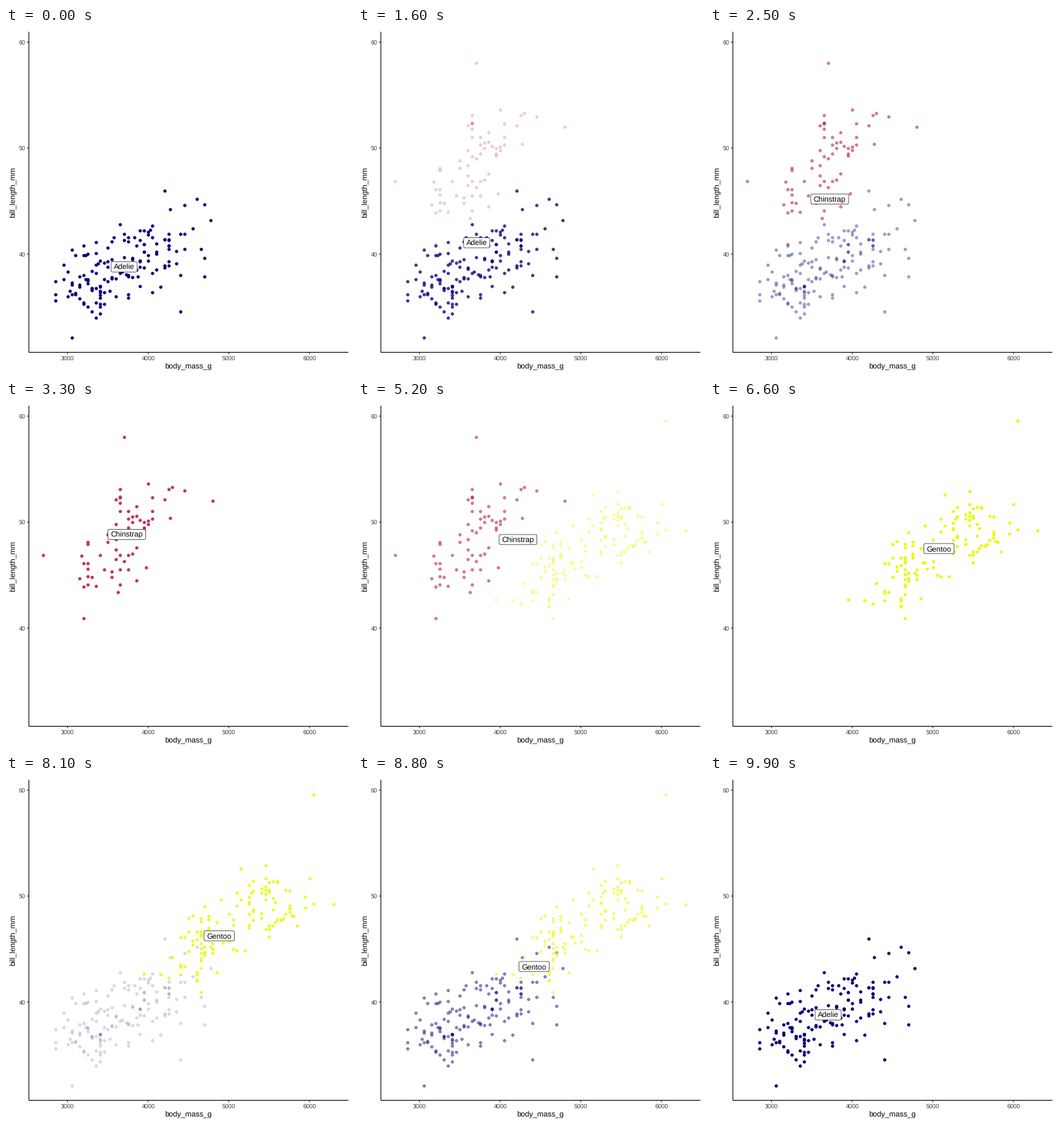
These frames come from a looping animation (504 by 504 pixels, 10000 ms). A matplotlib script:

```python
import numpy as np
import matplotlib.pyplot as plt
from matplotlib.animation import FuncAnimation
from matplotlib.patches import FancyBboxPatch

SIZE = 504
LEFT, RIGHT, TOP, BOTTOM = 33.3, 498.5, 5.5, 472.4
FRAMES, INTERVAL = 100, 100

plt.rcParams["font.family"] = "Liberation Sans"
plt.rcParams["text.hinting"] = "none"


def px(mass):
    return LEFT + (mass - 2520) * (RIGHT - LEFT) / 3960


def py(bill):
    return BOTTOM - (bill - 30.725) * (BOTTOM - TOP) / 30.25


# Each species is a female and a male cluster (count, mass, sd, bill, sd)
# plus its four most distant birds.
SPECIES = [
    dict(name="Adelie", color="#0a0078", mean=(3701, 38.79), box=38,
         clusters=[(73, 3370, 270, 37.3, 2.0), (74, 4040, 330, 40.3, 2.1)],
         far=[(3050, 32.1), (4400, 34.6), (4200, 46), (4775, 43.2)]),
    dict(name="Chinstrap", color="#c12f62", mean=(3733, 48.83), box=55,
         clusters=[(32, 3540, 220, 46.3, 1.7), (32, 3930, 310, 51.1, 1.4)],
         far=[(2700, 46.9), (3200, 40.9), (3700, 58), (4800, 52)]),
    dict(name="Gentoo", color="#ecf719", mean=(5076, 47.5), box=44,
         clusters=[(58, 4680, 270, 45.6, 1.9), (61, 5470, 290, 49.5, 1.9)],
         far=[(3950, 42.7), (4650, 40.9), (6050, 59.6), (6300, 49.2)]),
]


def bounded_normal(rng, n, limit=2.1):
    z = rng.normal(size=4 * n)
    return z[np.abs(z) < limit][:n]


def birds(species, rng):
    mass, bill = np.array(species["far"], float).T
    for n, m, m_sd, b, b_sd in species["clusters"]:
        z = bounded_normal(rng, n)
        w = 0.25 * z + 0.95 * bounded_normal(rng, n)
        step = np.where(rng.random(n) < 0.2, 25, 50)  # scale resolution in g
        mass = np.append(mass, np.round((m + m_sd * z) / step) * step)
        bill = np.append(bill, np.round(b + b_sd * w, 1))
    return px(mass), py(bill)


fig = plt.figure(figsize=(SIZE / 72, SIZE / 72), dpi=72, facecolor="white")
ax = fig.add_axes([0, 0, 1, 1])
ax.set(xlim=(0, SIZE), ylim=(SIZE, 0))
ax.axis("off")


def line(x, y, color="black"):
    ax.plot(x, y, color=color, lw=1.07, solid_capstyle="butt", snap=False, zorder=1)


def draw_axes():
    tick, grey = "#262626", "#3c3c3c"
    for mass in range(3000, 7000, 1000):
        x = px(mass)
        line([x, x], [BOTTOM, BOTTOM + 2.75], tick)
        ax.text(x, BOTTOM + 11.7, str(mass), size=8.8, color=grey, ha="center")
    for bill in (40, 50, 60):
        y = py(bill)
        line([LEFT - 2.75, LEFT], [y, y], tick)
        ax.text(LEFT - 4.95, y + 3.3, str(bill), size=8.8, color=grey, ha="right")
    line([LEFT, RIGHT], [BOTTOM, BOTTOM])
    line([LEFT, LEFT], [TOP, BOTTOM])
    ax.text((LEFT + RIGHT) / 2, 496.5, "body_mass_g", size=11, ha="center")
    ax.text(14, (TOP + BOTTOM) / 2, "bill_length_mm", size=11, ha="center",
            va="baseline", rotation=90, rotation_mode="anchor")


draw_axes()
rng = np.random.default_rng(7)
clouds = [ax.scatter(*birds(s, rng), s=3.9 ** 2, c=s["color"], linewidths=0.7,
                     edgecolors=s["color"], snap=False, zorder=2 + i)
          for i, s in enumerate(SPECIES)]

box = FancyBboxPatch((0, 0), 1, 1, boxstyle="round,pad=0,rounding_size=2.2",
                     fc="white", ec="black", lw=0.6, zorder=8)
ax.add_patch(box)
label = ax.text(0, 0, "", size=11, ha="center", zorder=9)

# (last still frame before moving, first moving frame, arrival frame)
MOVES = [(11, 12, 33), (44, 46, 66), (78, 79, 99)]


def phase(frame):
    """Return the leaving species, the entering one and the progress."""
    for i, (start, first, end) in enumerate(MOVES):
        if frame < first:
            return i, (i + 1) % 3, 0.0
        if frame < end:
            return i, (i + 1) % 3, (frame - start) / (end - start)
    return 0, 1, 0.0


def update(frame):
    old, new, t = phase(frame)
    for i, cloud in enumerate(clouds):
        cloud.set_alpha({old: 1 - t, new: t}.get(i, 0))

    a, b = SPECIES[old], SPECIES[new]
    mass, bill = (1 - t) * np.array(a["mean"]) + t * np.array(b["mean"])
    x, y = px(mass), py(bill)
    shown = a if t < 0.5 else b
    box.set_bounds(x - shown["box"] / 2, y - 7.4, shown["box"], 14.8)
    label.set_text(shown["name"])
    label.set_position((x, y + 4))
    return [*clouds, box, label]


anim = FuncAnimation(fig, update, frames=FRAMES, interval=INTERVAL,
                     repeat=True, repeat_delay=0, blit=False)
plt.show()
```
